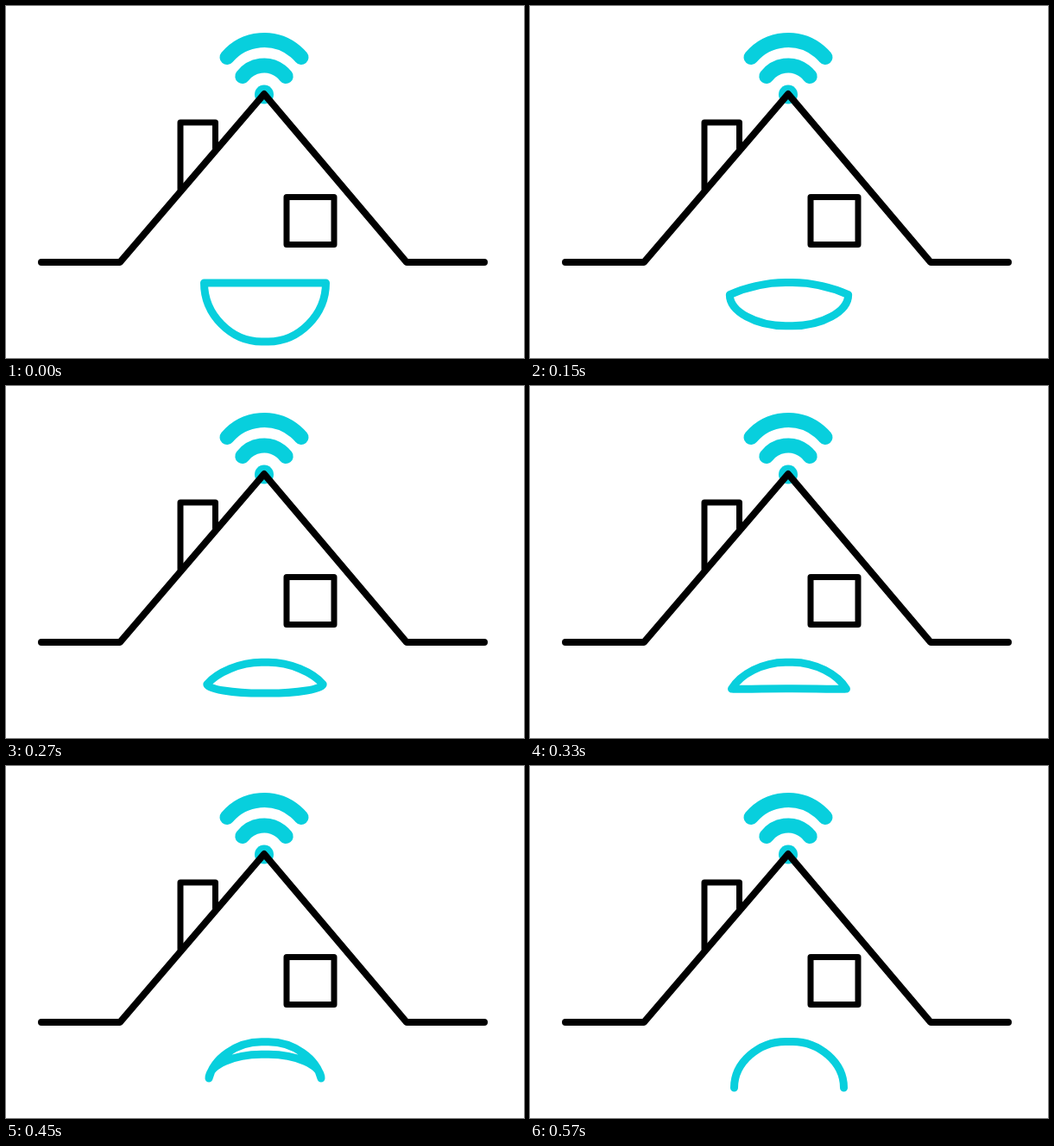
An HTML page with a canvas that plays this animation: 600 by 408 pixels, repeating every 0.6 s.

```html
<!DOCTYPE html>
<html lang="en">
<head>
<meta charset="utf-8">
<title>Smart home</title>
<style>
html, body { margin: 0; width: 100%; height: 100%; overflow: hidden; background: #fff; }
canvas { display: block; width: 600px; height: 408px; }
</style>
</head>
<body>
<canvas id="stage" width="600" height="408"></canvas>
<script>
const ctx = document.getElementById('stage').getContext('2d');
const CYAN = '#08cfdd';
const BLACK = '#000';
const STEP = 30;
const COUNT = 20;
const MID = 300;

const mix = (a, b, p) => a + (b - a) * p;

function stroke(color, width) {
  ctx.strokeStyle = color;
  ctx.lineWidth = width;
  ctx.stroke();
}

function line(points, width) {
  ctx.beginPath();
  points.forEach(([x, y]) => ctx.lineTo(x, y));
  stroke(BLACK, width);
}

// Arc with the given half chord and sagitta
function wave(x, top, half, sag) {
  const r = (half * half + sag * sag) / (2 * sag);
  const a = Math.asin(half / r);
  ctx.beginPath();
  ctx.arc(x, top + r, r, -Math.PI / 2 - a, -Math.PI / 2 + a);
  stroke(CYAN, 17);
}

function drawHouse() {
  wave(299, 39.5, 43, 20);
  wave(299, 69, 25.2, 12.5);
  ctx.fillStyle = CYAN;
  ctx.beginPath();
  ctx.arc(299, 102.5, 11, 0, Math.PI * 2);
  ctx.fill();

  line([[202, 212], [202, 135], [242.5, 135], [242.5, 165]], 7);
  ctx.beginPath();
  ctx.rect(325, 221.5, 55, 55);
  stroke(BLACK, 7);
  line([[41, 297], [132, 297], [299, 102], [464, 297], [554, 297]], 8);
}

// Mirrored curve from the left corner over the middle to the right corner
function bow(cx, cy, ax, ay, bx, by, y) {
  const flip = x => 2 * MID - x;
  ctx.moveTo(cx, cy);
  ctx.bezierCurveTo(ax, ay, bx, by, MID - 4, y);
  ctx.lineTo(MID + 4, y);
  ctx.bezierCurveTo(flip(bx), by, flip(ax), ay, flip(cx), cy);
}

// The lower lip trails slightly around the flat pose
function trail(n) {
  if (n <= 9 || n >= 15) return 0;
  return 4.2 * (n <= 13 ? (n - 9) / 4 : (15 - n) / 2);
}

function drawMouth(n) {
  const p = n / (COUNT - 1);
  const cx = mix(229.5, 236.5, p);
  const cy = mix(321, 373, p);
  const top = mix(321, 319.5, p);
  const d = trail(n);
  const low = mix(389, 319.5, p) + d;

  ctx.beginPath();
  bow(cx, cy, mix(253, 236.5, p), mix(321, 343.6, p), mix(276, 265, p), top, top);
  bow(cx, cy, cx, mix(358, 343.6, p) + d, mix(261, 265, p), low, low);
  stroke(CYAN, 9);
}

function frame() {
  const n = Math.floor(performance.now() / STEP) % COUNT;
  ctx.fillStyle = '#fff';
  ctx.fillRect(0, 0, 600, 408);
  ctx.lineCap = ctx.lineJoin = 'round';
  drawHouse();
  drawMouth(n);
  requestAnimationFrame(frame);
}
frame();
</script>
</body>
</html>
```
